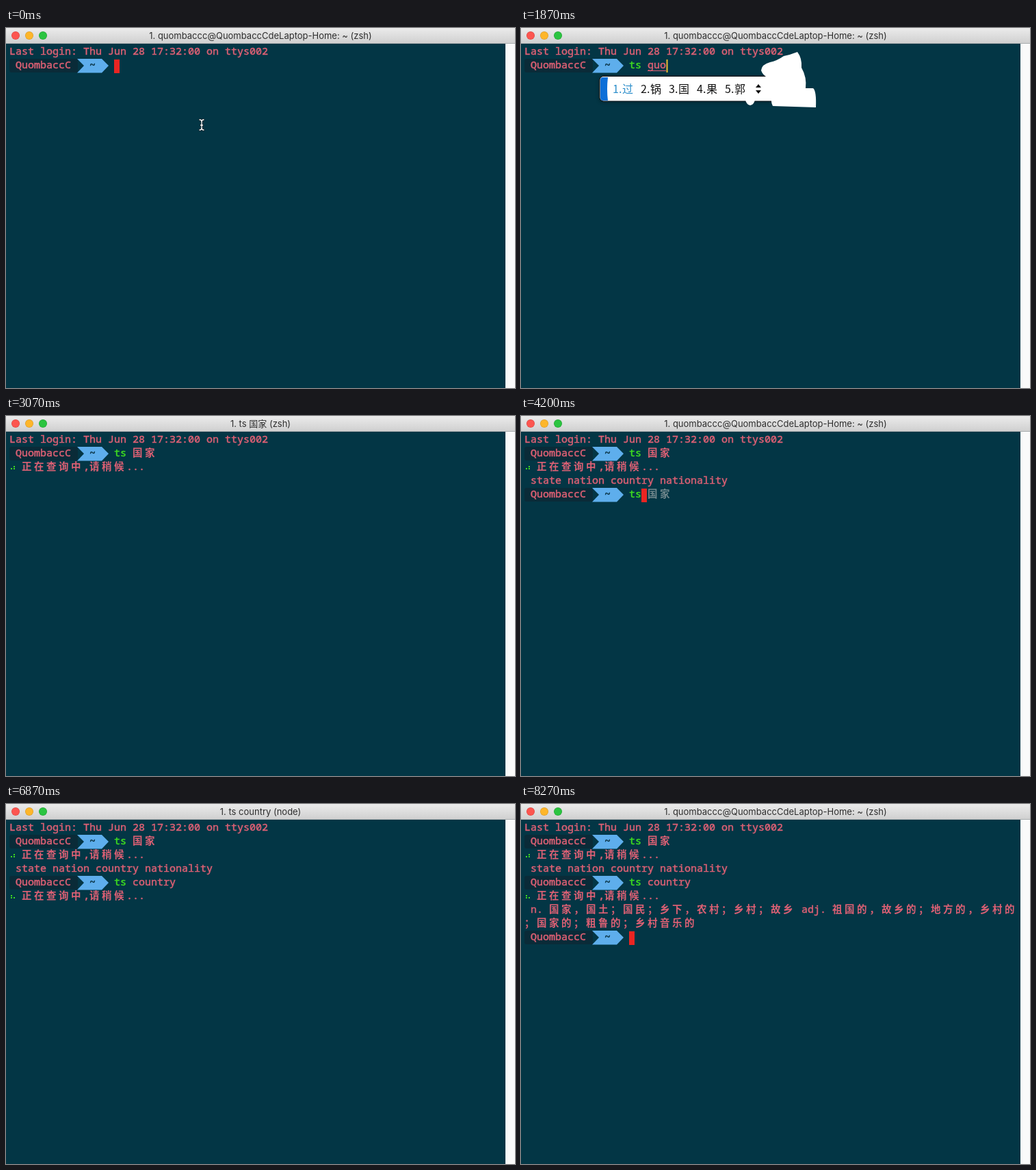
Write an HTML page with a canvas that moves like this. It is 744 px wide and 526 px high and loops after 8590 ms.

```html
<!DOCTYPE html>
<html lang="zh-CN">
<head>
<meta charset="utf-8">
<style>
  html, body { margin: 0; width: 100%; height: 100%; overflow: hidden; background: #033645; }
  canvas { display: block; }
</style>
</head>
<body>
<canvas id="stage" width="744" height="526"></canvas>
<script>
const ctx = document.getElementById('stage').getContext('2d');
const LOOP = 8590, CELL = 9, LEFT = 5, ROW = 20;
const PINK = '#dd6074', GREEN = '#3edb20', GHOST = '#71878c', RED = '#ea2522', BG = '#033645';
const MONO = '15px "Noto Sans Mono", monospace';
const CJK = 'bold 14.5px "Noto Sans CJK SC", sans-serif';
const UI = '13px Inter, "Noto Sans CJK SC", sans-serif';
const IME = '16px "Noto Sans CJK SC", sans-serif';
const USER = 'QuombaccC';
const IDLE = '1. quombaccc@QuombaccCdeLaptop-Home: ~ (zsh)';
const WAIT = '正在查询中,请稍候...';
const SPINNER = '⠋⠙⠹⠸⠼⠴⠦⠧⠇⠏';

// Each entry: start time, typed text, grey suggestion
const FIRST = [[0, '', ''], [470, 't', ''], [730, 'ts', ''], [1000, 'ts ', ''], [2270, 'ts 国家', '']];
const SECOND = [[0, '', ''], [4000, 't', 's 国家'], [4200, 'ts', ' 国家'], [4400, 'ts ', '国家'],
  [4670, 'ts c', 'ountry'], [4870, 'ts co', 'untry'], [5070, 'ts cou', 'ntry'],
  [5270, 'ts coun', 'try'], [5600, 'ts count', 'ry'], [5800, 'ts countr', 'y'], [6000, 'ts country', '']];
// Each entry: start time, pinyin, candidates
const COMPOSE = [[1400, 'g', '个 给 过 该 跟'], [1600, 'gu', '故 古 顾 股 谷'], [1800, 'guo', '过 锅 国 果 郭'],
  [1930, 'guoj', '国家 国际 过节 国 过'], [2060, 'guojia', '国家 过家家 国价 果架 锅加']];

const current = (list, t) => list.filter(e => e[0] <= t).pop();
const isWide = c => c > '\u2fff';
const colX = col => LEFT + col * CELL;
const baseline = row => 39 + row * ROW;

function rect(x, y, w, h, color) {
  ctx.fillStyle = color;
  ctx.fillRect(x, y, w, h);
}

function shape(color, d) {
  ctx.fillStyle = color;
  ctx.fill(new Path2D(d));
}

function disc(x, y, rx, ry, color) {
  ctx.fillStyle = color;
  ctx.beginPath();
  ctx.ellipse(x, y, rx, ry, 0, 0, 7);
  ctx.fill();
}

// Writes on the terminal grid and returns the next free column
function write(text, col, row, color = PINK) {
  ctx.fillStyle = ctx.strokeStyle = color;
  ctx.lineWidth = 0.5;
  for (const c of text) {
    ctx.font = isWide(c) ? CJK : MONO;
    ctx.fillText(c, colX(col), baseline(row));
    if (!isWide(c)) ctx.strokeText(c, colX(col), baseline(row));
    col += isWide(c) ? 2 : 1;
  }
  return col;
}

function prompt(row) {
  ctx.save();
  ctx.translate(0, 25 + row * ROW);
  shape('#0a2b38', 'M8 0H105V20H8Q5 20 5 17V3Q5 0 8 0Z');
  shape('#5eaeec', 'M104 0H140L150 10L140 20.5H104L114 10Z');
  ctx.restore();
  write(USER, 1, row);
  write('~', 13, row, '#0a3444');
}

function command(row, typed, ghost, showCursor) {
  prompt(row);
  let col = write(typed.slice(0, 2), 17, row, GREEN);
  col = write(typed.slice(2), col, row);
  write(ghost, col, row, GHOST);
  if (!showCursor) return;
  rect(colX(col), 26 + row * ROW, 8, 20, RED);
  if (ghost) write(ghost[0], col, row, '#3c1820');
}

function waiting(row, elapsed, last) {
  const step = Math.min(Math.floor(elapsed / 80), last);
  const bits = SPINNER.charCodeAt(step) - 0x2800;
  for (let i = 0; i < 6; i++)
    if (bits >> i & 1) rect(i < 3 ? 7 : 11, 30 + row * ROW + i % 3 * 3, 2, 2, GREEN);
  write(WAIT, 2, row);
}

function inputPanel([, pinyin, candidates]) {
  const end = write(pinyin, 20, 1);
  rect(colX(20), 62, pinyin.length * CELL, 1, PINK);
  rect(colX(end) + 0.5, 46, 2, 19, '#f2bd32');

  const words = candidates.split(' ');
  const grow = 16 * (words.join('').length - words.length);
  ctx.save();
  ctx.shadowColor = '#0008';
  ctx.shadowBlur = 5;
  ctx.shadowOffsetY = 1;
  ctx.fillStyle = '#fff';
  ctx.strokeStyle = '#050a0e';
  ctx.lineWidth = 2;
  ctx.beginPath();
  ctx.roundRect(115.5, 71, 272 + grow, 35.5, 5);
  ctx.stroke();
  ctx.shadowColor = 'transparent';
  ctx.fill();
  ctx.restore();
  shape('#0d6fd8', 'M120 72H127Q125 89 127 106H120Q116 106 116 102V76Q116 72 120 72Z');

  let x = 134;
  ctx.font = IME;
  words.forEach((word, i) => {
    ctx.fillStyle = i ? '#111' : '#2a8dca';
    ctx.fillText(i + 1 + '.', x, 95);
    ctx.fillText(word, x + 14, 95);
    x += 25 + 16 * word.length;
  });

  ctx.save();
  ctx.translate(grow, 0);
  shape('#111', 'M343 87L347 82L351 87ZM343 91L347 96L351 91Z');
  disc(335, 103, 7, 10, '#fff');
  shape('#fff', 'M351 62Q352 53 364 50Q374 48 384 41Q394 39 404 35Q411 44 410 58Q418 72 416 88H427Q432 92 431 116L368 114Q364 108 367 90L376 73Q356 76 351 62Z');
  ctx.restore();
}

function windowFrame(title) {
  rect(0, 0, 744, 526, BG);
  rect(730, 22, 14, 504, '#fafafa');
  const bar = ctx.createLinearGradient(0, 0, 0, 22);
  bar.addColorStop(0, '#ebebeb');
  bar.addColorStop(1, '#d0d0d0');
  rect(0, 0, 744, 22, bar);
  rect(0, 22, 744, 1, '#a9adaf');
  [['#df4642', '#fc5650'], ['#dd9d28', '#fdb62a'], ['#25a636', '#2bc440']].forEach(([rim, fill], i) => {
    disc(14 + i * 20, 11, 6, 6, rim);
    disc(14 + i * 20, 11, 5.3, 5.3, fill);
  });
  ctx.fillStyle = '#2e2e2e';
  ctx.font = UI;
  ctx.textAlign = 'center';
  ctx.fillText(title, 372, 16);
  ctx.textAlign = 'left';
}

function titleAt(t) {
  if (t >= 2470 && t < 3270) return '1. ts 国家 (zsh)';
  if (t >= 6200 && t < 7130) return `1. ts country (${t < 6400 ? 'zsh' : 'node'})`;
  return IDLE;
}

function pointer() {
  ctx.lineCap = 'round';
  for (const [width, color] of [[3, '#10222a'], [1.3, '#fff']]) {
    ctx.lineWidth = width;
    ctx.strokeStyle = color;
    ctx.stroke(new Path2D('M283 134Q286 134 286 137V146Q286 149 283 149M289 134Q286 134 286 137M286 146Q286 149 289 149M284.5 142H287.5'));
  }
}

function draw(t) {
  windowFrame(titleAt(t));
  write('Last login: Thu Jun 28 17:32:00 on ttys002', 0, 0);

  const composing = t >= 1400 && t < 2270;
  const [, typed, ghost] = current(FIRST, t);
  command(1, typed, ghost, t < 2470 && !composing);
  if (composing) inputPanel(current(COMPOSE, t));
  if (t < 470) pointer();

  if (t >= 2660) waiting(2, t - 2660, 5);
  if (t >= 3270) {
    write('state nation country nationality', 1, 3);
    const [, text, hint] = current(SECOND, t);
    command(4, text, hint, t < 6200);
  }
  if (t >= 6380) waiting(5, t - 6380, 6);
  if (t >= 7070) {
    write('n. 国家，国土；国民；乡下，农村；乡村；故乡 adj. 祖国的，故乡的；地方的，乡村的', 1, 6);
    write('；国家的；粗鲁的；乡村音乐的', 0, 7);
  }
  if (t >= 7130) command(8, '', '', true);
}

const start = performance.now();
function tick() {
  draw((performance.now() - start) % LOOP);
  requestAnimationFrame(tick);
}
tick();
</script>
</body>
</html>
```
